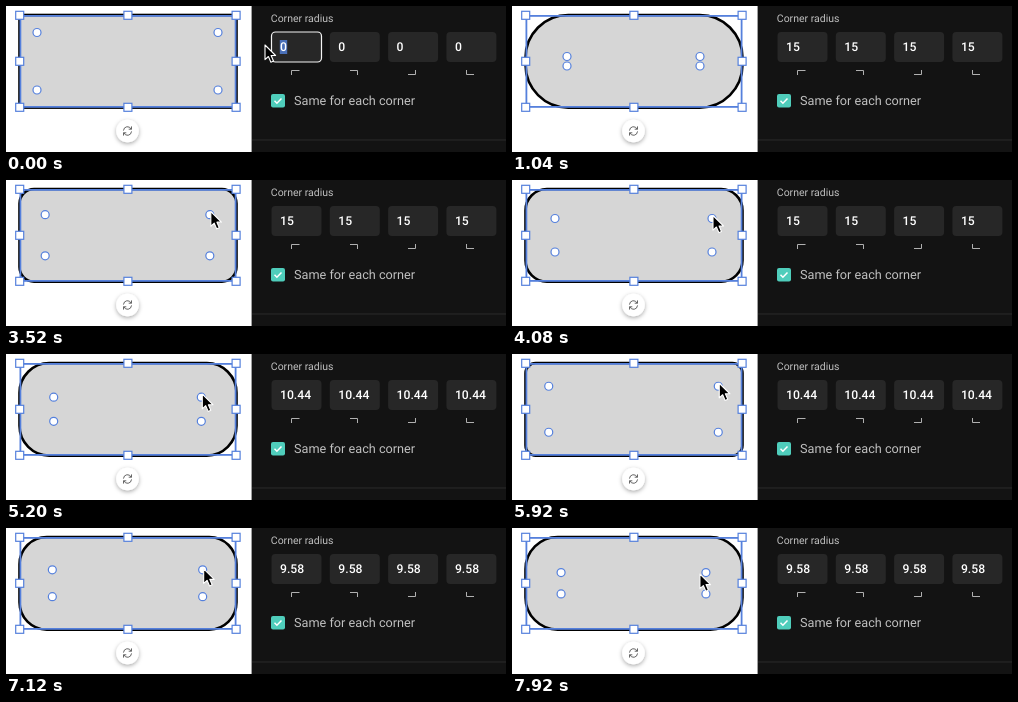
An HTML page that plays this animation: 500x146 px, repeating every 8000 ms.

```html
<!DOCTYPE html>
<html lang="en">
<head>
<meta charset="utf-8">
<title>Corner radius</title>
<style>
  html, body { margin: 0; width: 100%; height: 100%; overflow: hidden; background: #fff; }
  svg { display: block; width: 500px; height: 146px; font-family: Roboto, Arial, sans-serif; text-rendering: geometricPrecision; }
  .blue { fill: #fff; stroke: #5580dc; stroke-width: 1.2; }
  .field { fill: #272727; }
  .focus { fill: #272727; stroke: #f4f4f4; stroke-width: 1.2; }
  .value { fill: #fff; font-size: 12.2px; font-weight: 500; }
  .line { fill: none; stroke: #b0b0b0; }
  .label { fill: #c0c0c0; }
  .spin { fill: none; stroke: #666; stroke-linecap: round; stroke-linejoin: round; }
</style>
</head>
<body>
<svg viewBox="0 0 500 146">
  <defs>
    <filter id="shadow" x="-50%" y="-50%" width="200%" height="200%">
      <feDropShadow dx="0" dy="1.5" stdDeviation="2.2" flood-color="#000" flood-opacity=".35"/>
    </filter>
  </defs>
  <rect width="500" height="146" fill="#fff"/>
  <rect id="shape" x="13.5" y="9" width="217" height="92.6" fill="#d6d6d6" stroke="#000" stroke-width="2.6"/>
  <rect x="14.4" y="9.9" width="215.2" height="91" fill="none" stroke="#5580dc" stroke-width="1.8"/>
  <g id="grips"></g>
  <g id="dots"></g>
  <circle cx="121.5" cy="125" r="11.3" fill="#fff" filter="url(#shadow)"/>
  <g class="spin">
    <path d="M117.5 124.2a4 4 0 0 1 7.6-1.2M125.5 120.8v2.4h-2.4"/>
    <path d="M125.5 125.8a4 4 0 0 1-7.6 1.2M117.5 129.2v-2.4h2.4"/>
  </g>

  <rect x="245.6" width="255" height="146" fill="#131313"/>
  <path d="M246 134H500" stroke="#2a2a2a"/>
  <text class="label" x="264.8" y="16.2" font-size="10.5">Corner radius</text>
  <g id="fields"></g>
  <path class="line" d="M285.5 69V64.5H293.5M344 64.5H351.5V69M402 68.5H409.5V64M460.5 64V68.5H468"/>
  <rect x="265" y="88" width="14" height="13.5" rx="2" fill="#4fcdbb"/>
  <path d="M268.5 94.8l2.4 2.4 4.6-4.8" fill="none" stroke="#fff" stroke-width="1.5"/>
  <text class="label" x="288" y="99.3" font-size="12.7">Same for each corner</text>
  <path id="cursor" d="M0 0V14.6L3.4 11.5L5.9 17.2L8.5 16L6.1 10.5H10.6Z" fill="#000" stroke="#fff" stroke-width="1.1" stroke-linejoin="round"/>
</svg>
<script>
const LOOP = 8000, STEP = 80;
const $ = id => document.getElementById(id);

function add(parent, tag, attrs) {
  const el = document.createElementNS("http://www.w3.org/2000/svg", tag);
  for (const k in attrs) el.setAttribute(k, attrs[k]);
  return parent.appendChild(el);
}

// changes of the radius; a set one also reaches the fields
const drags = [
  { at: 880, span: 80, r: 15, set: true },
  { at: 2640, span: 800, r: 5 },
  { at: 3440, span: 640, r: 7.5 },
  { at: 4080, span: 720, r: 10.44, set: true },
  { at: 5360, span: 800, r: 1.7, set: true },
  { at: 6480, span: 560, r: 9.58, set: true },
  { at: 7280, span: 640, r: 11.3 }
];

// pointer offset from the top right dot
const glides = [
  { at: 160, span: 480, x: 2, y: 5 },
  { at: 880, span: 80, x: 26, y: -18 },
  { at: 1120, span: 640, x: 1, y: -3 },
  { at: 6080, span: 240, x: 6, y: -1 },
  { at: 6400, span: 160, x: 1, y: -1 },
  { at: 7440, span: 480, x: -6, y: 1.5 }
];

// eases a property through every step begun by time t
function follow(steps, key, first, t) {
  return steps.reduce((v, s) => {
    const p = Math.min(Math.max((t - s.at) / s.span, 0), 1);
    return v + (s[key] - v) * p * p * (3 - 2 * p);
  }, first);
}

for (let row = 0; row < 3; row++)
  for (let col = 0; col < 3; col++)
    if (row !== 1 || col !== 1)
      add($("grips"), "rect", { class: "blue", x: 9.7 + 108.2 * col, y: 5.3 + 46 * row, width: 8, height: 8 });

const dots = [0, 1, 2, 3].map(() => add($("dots"), "circle", { class: "blue", r: 4 }));

const fields = [0, 1, 2, 3].map(i => {
  const x = 265 + 58.3 * i;
  return {
    box: add($("fields"), "rect", { x: x + .5, y: 26, width: 50, height: 30, rx: 4 }),
    mark: add($("fields"), "rect", { x: x + 8.8, y: 34, width: 7.4, height: 14, fill: "#4a70b8" }),
    text: add($("fields"), "text", { class: "value", x: x + 9, y: 45.4 })
  };
});

const show = (el, on) => el.setAttribute("visibility", on ? "visible" : "hidden");

function draw(t) {
  const r = follow(drags, "r", 0, t);
  const inset = 1.6 * r, right = 212 - inset, top = 26.5 + inset;
  $("shape").setAttribute("rx", r * 2.85);
  dots.forEach((d, i) => {
    d.setAttribute("cx", i % 2 ? right : 31 + inset);
    d.setAttribute("cy", i < 2 ? top : 84 - inset);
  });

  const done = drags.filter(d => d.set && t >= d.at + d.span).pop();
  const typed = t < 560 ? "0" : t < 720 ? "1" : "15";
  fields.forEach((f, i) => {
    const active = !done && i === 0;
    f.box.setAttribute("class", active ? "focus" : "field");
    show(f.mark, active && t < 560);
    f.text.textContent = active ? typed : done ? done.r : 0;
  });

  const x = right + follow(glides, "x", 47, t);
  const y = top + follow(glides, "y", 12.5, t);
  $("cursor").setAttribute("transform", `translate(${x} ${y})`);
  show($("cursor"), t < 560 || t >= 1120);
}

const start = performance.now();
function tick() {
  const t = (performance.now() - start) % LOOP;
  draw(Math.floor(t / STEP) * STEP);
  requestAnimationFrame(tick);
}
draw(0);
requestAnimationFrame(tick);
</script>
</body>
</html>
```
